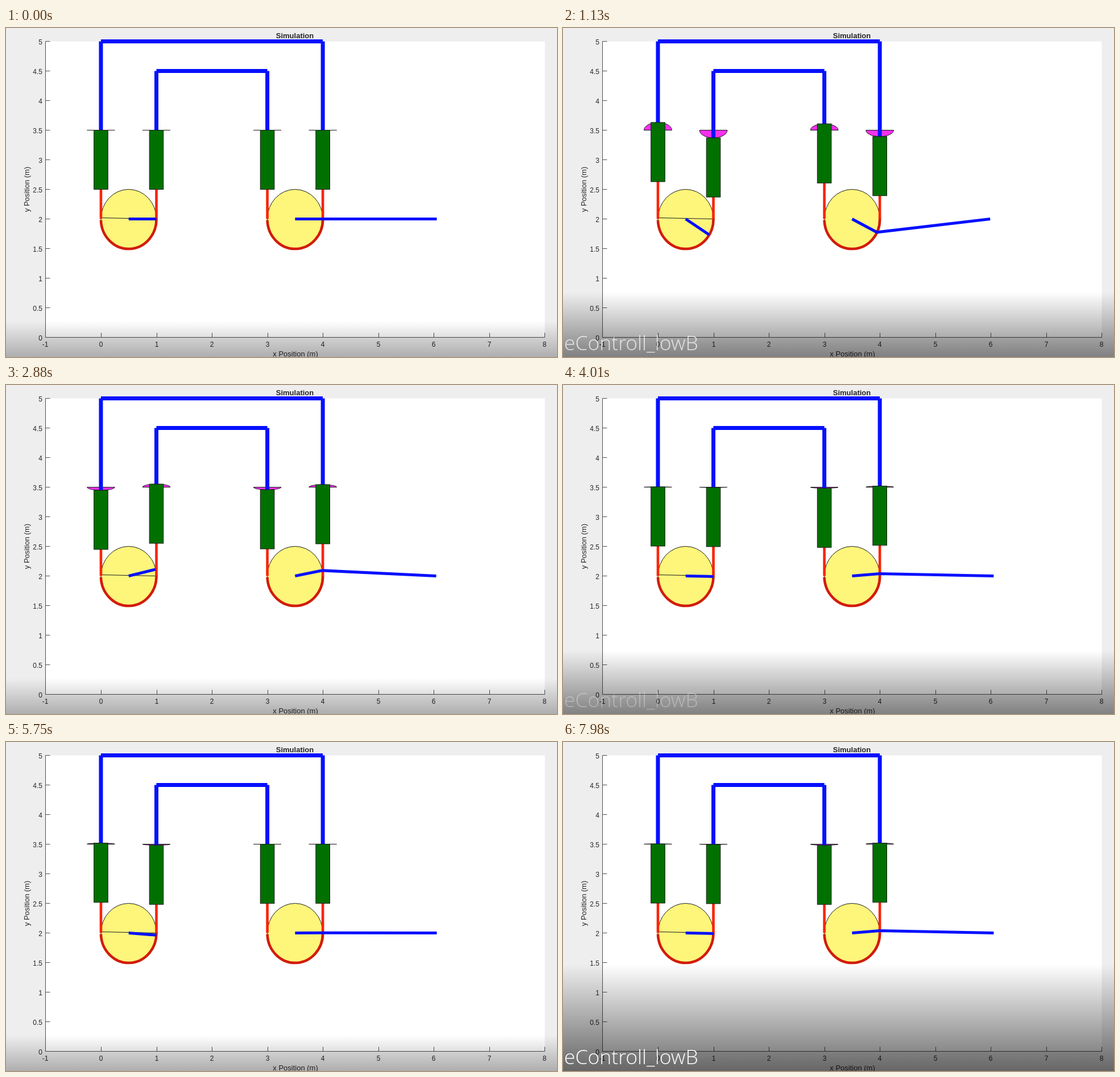
An HTML page that plays this animation: 969x578 px, repeating every 8000 ms.

```html
<!DOCTYPE html>
<html lang="en">
<head>
<meta charset="utf-8">
<title>Simulation</title>
<style>
  html, body { margin: 0; width: 100%; height: 100%; overflow: hidden; background: #eeeeee; }
  svg { display: block; width: 969px; height: 578px; font-family: "Liberation Sans", Arial, sans-serif; fill: none; }
  text { fill: #262626; font-size: 12px; }
  .axis { stroke: #4a4f55; stroke-width: 1; }
  .thin { stroke: #1a1a1a; stroke-width: 1; }
  .pipe { stroke: #0510ff; stroke-width: 7; }
  .arm { stroke: #0510ff; stroke-width: 5; }
  .rope { stroke: #fa2408; stroke-width: 4.6; }
  .belt { stroke: #d21c0a; stroke-width: 4.6; }
  .wheel { fill: #fef57b; }
  .cap { fill: #f531f0; }
  .piston { fill: #007000; }
  #caption { font: 300 35.5px "Open Sans", sans-serif; fill: #fff; }
</style>
</head>
<body>
<svg id="stage" viewBox="0 0 969 578" xmlns="http://www.w3.org/2000/svg">
  <defs>
    <linearGradient id="shade" x1="0" y1="0" x2="0" y2="1">
      <stop offset="0" stop-color="#000" stop-opacity="0"/>
      <stop id="dark" offset="1" stop-color="#000" stop-opacity=".27"/>
    </linearGradient>
  </defs>
</svg>
<script>
const LOOP = 8000;
const TAU = Math.PI * 2;
const stage = document.getElementById('stage');
const X = x => 69.4 + (x + 1) * 97.55;
const Y = y => 543.5 - y * 104;

function add(tag, attrs, text) {
  const el = document.createElementNS(stage.namespaceURI, tag);
  set(el, attrs);
  if (text !== undefined) el.textContent = text;
  stage.appendChild(el);
  return el;
}
function set(el, attrs) {
  for (const k in attrs) el.setAttribute(k, attrs[k]);
}
const path = (cls, d = '') => add('path', { class: cls, d });

// Axes
add('rect', { x: 70, y: 23.5, width: 877.5, height: 520, fill: '#fff' });
path('axis', 'M69.5 23.5V543.5H947.5');
for (let i = 0; i <= 10; i++) {
  const y = Math.round(Y(i / 2)) - .5;
  path('axis', `M69.5 ${y}h8`);
  add('text', { x: 64, y: y + 5, 'text-anchor': 'end' }, i / 2);
}
for (let i = -1; i <= 8; i++) {
  const x = Math.round(X(i)) + .5;
  path('axis', `M${x} 543.5v-8`);
  add('text', { x: x - .5, y: 560, 'text-anchor': 'middle' }, i);
}
const label = (text, attrs) => add('text', { 'text-anchor': 'middle', style: 'font-size:13px', ...attrs }, text);
label('Simulation', { x: 508, y: 18, 'font-weight': 'bold' });
label('x Position (m)', { x: 509, y: 577 });
label('y Position (m)', { transform: 'translate(41 283.5) rotate(-90)' });

// One cylinder with its membrane, rope and pipe; the pipe ends at height top
function cylinder(x, top) {
  const cx = X(x), rest = Y(3.5);
  const cap = path('thin cap'), rope = path('rope'), pipe = path('pipe');
  const piston = add('rect', { class: 'thin piston', x: cx - 12.3, width: 24.6, height: 104 });
  return shift => {
    const y = rest + shift;
    set(cap, { d: `M${cx - 24.4} ${rest}A24.4 ${Math.max(Math.abs(shift), .01)} 0 0 ${shift < 0 ? 1 : 0} ${cx + 24.4} ${rest}Z` });
    set(rope, { d: `M${cx} ${y + 104}V${Y(2)}` });
    set(pipe, { d: `M${cx} ${y}V${Y(top)}` });
    set(piston, { y });
  };
}

// A wheel driven by two cylinders, with a crank and an optional sliding rod
function wheel(x, leftTop, rightTop, rod) {
  const cx = X(x + .5), cy = Y(2), rx = 48.8, ry = 52;
  add('ellipse', { class: 'thin wheel', cx, cy, rx, ry });
  if (!rod) path('thin', `M${cx - 48} ${cy - 2}L${cx + 48} ${cy}`);
  path('belt', `M${cx - rx} ${cy + 2}A${rx} ${ry} 0 0 0 ${cx + rx} ${cy - 1}`);
  const left = cylinder(x, leftTop), right = cylinder(x + 1, rightTop);
  const arm = path('arm');
  return angle => {
    left(24 * angle);
    right(-24 * angle);
    const px = x + .5 + .5 * Math.cos(angle), py = .5 * Math.sin(angle);
    let d = `M${cx} ${cy}L${X(px)} ${Y(2 + py)}`;
    if (rod) d += `L${X(px + Math.sqrt(rod * rod - py * py))} ${cy}`;
    set(arm, { d });
  };
}
const master = wheel(0, 5, 4.5, 0);
const slave = wheel(3, 4.5, 5, 2.055);
path('pipe', `M${X(0)} ${Y(5)}H${X(4)}`);
path('pipe', `M${X(1)} ${Y(4.5)}H${X(3)}`);

// Player overlay
const veil = add('rect', { x: 0, width: 969, fill: 'url(#shade)' });
const caption = add('text', { id: 'caption', x: 2, y: 566 }, 'eControll_lowB');
const dark = document.getElementById('dark');

// time, phase, lag of the second wheel
const RUN = [
  [0, 0, 0], [1063, 0, 0], [1130, .59, .115], [2880, 2 * TAU + 3.36, .04], [3933, 4 * TAU + .02, .097],
  [4760, 4 * TAU + .02, .097], [4760, 0, 0],
  [4858, 0, 0], [4925, .48, .1], [5750, TAU + .067, .077], [7010, 2 * TAU + 2.68, .1],
  [7760, 3 * TAU + .02, .097], [LOOP, 3 * TAU + .02, .097]
];
// overlay: fade in from, to, fade out from, to
const FADES = [[40, 330, 900, 1290], [3930, 4300, 4740, 5130], [7730, 7990, 9000, 9400]];

const clamp = v => Math.min(1, Math.max(0, v));

function motion(t) {
  const i = RUN.findIndex((k, n) => n && t < k[0]);
  const a = RUN[i - 1], b = RUN[i], f = (t - a[0]) / (b[0] - a[0]);
  return [1, 2].map(n => a[n] + (b[n] - a[n]) * f);
}

function overlay(t) {
  for (const [a, b, c, d] of FADES) {
    if (t < a || t > d) continue;
    if (t < c) {
      const p = 1 - (1 - clamp((t - a) / (b - a))) ** 2;
      return [p, p ** 1.2];
    }
    const p = 1 - (t - c) / (d - c);
    return [p, clamp(p * 1.85)];
  }
  return [0, 0];
}

function draw(t) {
  const [phase, lag] = motion(t);
  master(-Math.sin(phase));
  slave(-Math.sin(phase - lag));
  const [p, ink] = overlay(t);
  const top = 515 - 125 * p;
  set(veil, { y: top, height: 578 - top });
  set(dark, { 'stop-opacity': .27 + .3 * Math.sqrt(p) });
  set(caption, { opacity: ink });
}

const start = performance.now();
function tick() {
  draw((performance.now() - start) % LOOP);
  requestAnimationFrame(tick);
}
tick();
</script>
</body>
</html>
```
